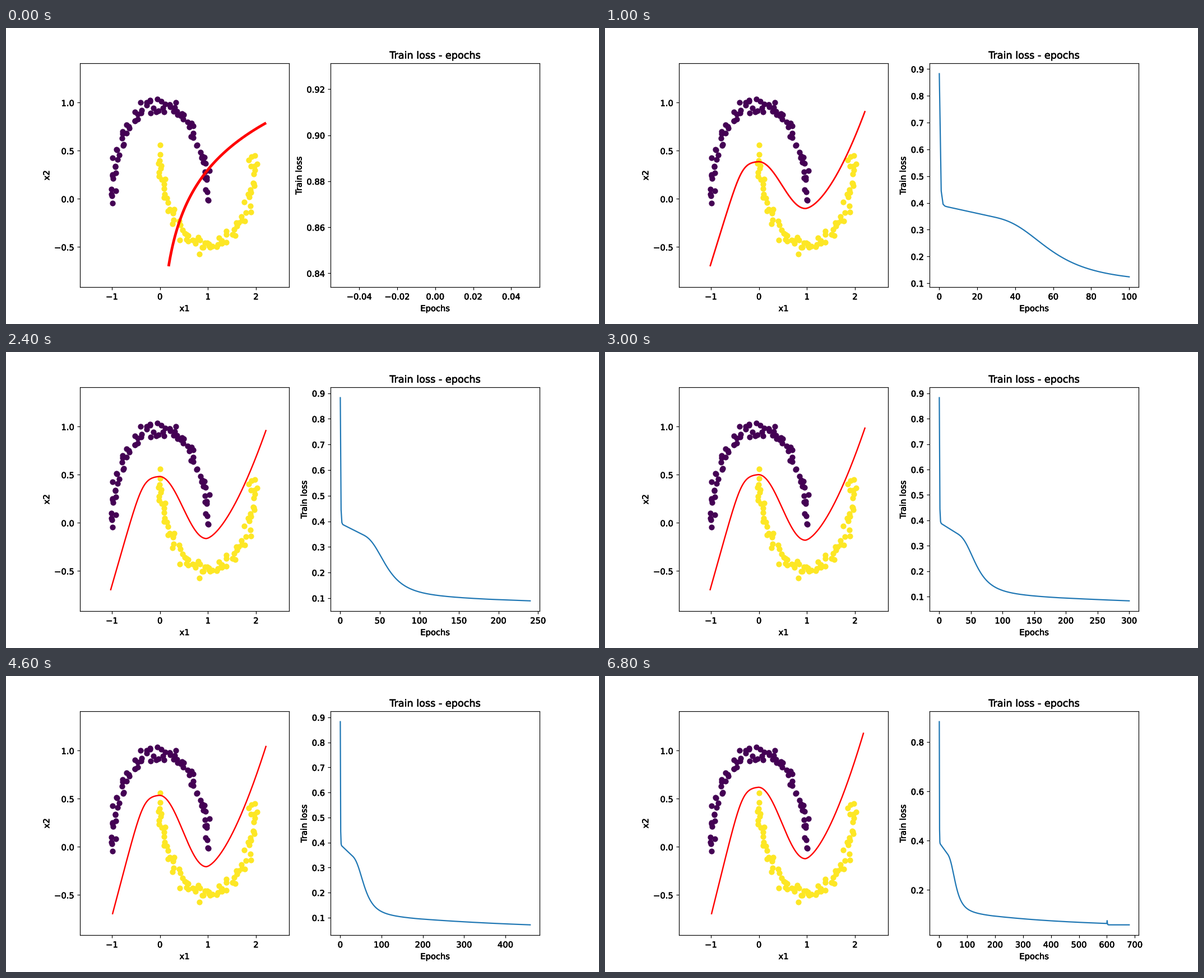
A matplotlib script for the animation above (7 s loop, 1058 by 529 pixels).

```python
import numpy as np
import matplotlib.pyplot as plt
from matplotlib.animation import FuncAnimation
from matplotlib.patheffects import withStroke

FRAMES, INTERVAL, EPOCHS_PER_FRAME = 35, 200, 20
RIGHT_X, LOWEST_Y, HIGHEST_Y = 2.21, -0.7, 1.2
PEAK_X, TROUGH_X = -0.01, 0.965

plt.rcParams["font.family"] = "DejaVu Sans"
heavy = [withStroke(linewidth=0.4, foreground="black")]


def training_loss(epoch):
    """Fast drop, slow plateau, second drop, long tail, then a spike and a floor."""
    plateau = np.maximum(.392 - .00155 * epoch, .1)
    tail = .05 + .0772 * np.exp(-epoch / 355)
    late = np.maximum(epoch - 28, 0) ** 2.7
    learned = late / (late + 34.7 ** 2.7)
    loss = plateau + (tail - plateau) * learned + .4906 * np.exp(-2.2 * epoch)
    spike = .0587 + .017 * np.exp(-np.maximum(epoch - 601, 0))
    return np.where(epoch > 600, spike, loss)


epochs = np.arange((FRAMES - 1) * EPOCHS_PER_FRAME + 1)
loss = training_loss(epochs)

# Key poses of the boundary: epoch, left end x, peak y, trough y, right end y
poses = np.array([(20, -1.12, .00, .14, .86),
                  (60, -.91, .148, .026, .89),
                  (160, -1.045, .448, -.131, .92),
                  (380, -1.01, .523, -.198, 1.02),
                  (560, -.97, .549, -.212, 1.08),
                  (680, -.99, .62, -.122, 1.24)])
pose_progress = -loss[poses[:, 0].astype(int)]


def bend(t):
    """Flat start that turns into a straight arm, from 0 to 1."""
    def softplus(s):
        return np.log1p(np.exp((s - .33) / .09))
    return (softplus(t) - softplus(0)) / (softplus(1) - softplus(0))


def boundary(frame):
    t = np.linspace(0, 1, 120)
    if frame == 0:
        return .18 + 2.03 * t, LOWEST_Y + 1.49 * np.log1p(10 * t) / np.log(11)
    now = loss[frame * EPOCHS_PER_FRAME]
    left, peak, trough, end = (np.interp(-now, pose_progress, part) for part in poses.T[1:])
    power = 1.55 + 3.8 * max(now - .1, 0)
    x = np.concatenate([left + (PEAK_X - left) * t,
                        PEAK_X + (TROUGH_X - PEAK_X) * t,
                        TROUGH_X + (RIGHT_X - TROUGH_X) * t])
    y = np.concatenate([peak + (LOWEST_Y - peak) * bend(1 - t),
                        peak + (trough - peak) * (1 - np.cos(np.pi * t)) / 2,
                        trough + (end - trough) * t ** power])
    inside = y <= HIGHEST_Y
    return x[inside], y[inside]


rng = np.random.default_rng(7)


def moon(cx, cy, sign, count=84, noise=.045):
    angle = np.linspace(0, np.pi, count)
    jitter_x, jitter_y = rng.normal(0, noise, (2, count))
    return cx + sign * np.cos(angle) + jitter_x, cy + sign * np.sin(angle) + jitter_y


def thicken_text(ax):
    labels = [ax.title, ax.xaxis.label, ax.yaxis.label]
    for text in labels + ax.get_xticklabels() + ax.get_yticklabels():
        text.set_path_effects(heavy)


fig, (moons_ax, loss_ax) = plt.subplots(1, 2, figsize=(10, 5), dpi=105.8)
fig.subplots_adjust(left=.125, right=.9, bottom=.125, top=.88, wspace=.2)

moons_ax.scatter(*moon(0, 0, 1), color="#440154")
moons_ax.scatter(*moon(1, .5, -1), color="#fde725")
moons_ax.set(xlim=(-1.662, 2.687), ylim=(-.915, 1.407), xlabel="x1", ylabel="x2")
boundary_line, = moons_ax.plot([], [], color="red", solid_capstyle="butt")
thicken_text(moons_ax)

loss_ax.set(title="Train loss - epochs", xlabel="Epochs", ylabel="Train loss")
loss_line, = loss_ax.plot([], [], color="#1f77b4")


def update(frame):
    boundary_line.set_data(*boundary(frame))
    boundary_line.set_linewidth(1.65 + 1.6 * np.exp(-frame / 2.2))
    count = frame * EPOCHS_PER_FRAME + 1
    loss_line.set_data(epochs[:count], loss[:count])
    loss_ax.relim()
    loss_ax.autoscale_view()
    thicken_text(loss_ax)
    return boundary_line, loss_line


animation = FuncAnimation(fig, update, frames=FRAMES, init_func=lambda: update(0),
                          interval=INTERVAL, repeat=True, repeat_delay=0, blit=False)
plt.show()
```
